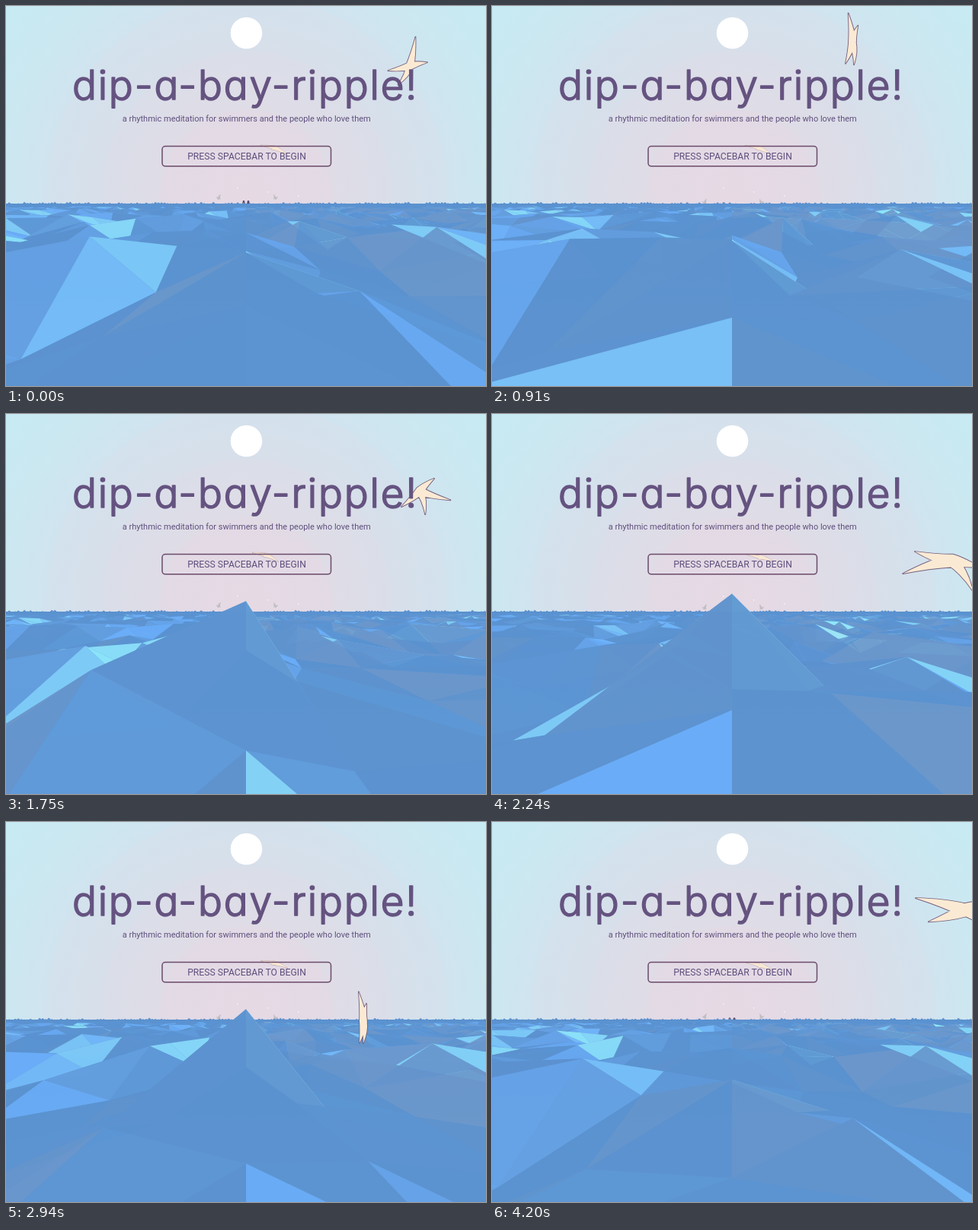
An HTML page with a canvas that plays this animation: 630x500 px, repeating every 4.27 s.

```html
<!DOCTYPE html>
<html lang="en">
<head>
<meta charset="utf-8">
<title>dip-a-bay-ripple!</title>
<style>
  html, body { margin: 0; width: 100%; height: 100%; overflow: hidden; }
  body {
    background: radial-gradient(circle at 316px 250px,
      #e6d9e4 0, #e2dae5 112px, #dfdce6 114px, #dadee9 190px, #d7dfea 192px,
      #d3e2ed 263px, #d0e4ef 265px, #cbe8f1 330px, #c6ebf4 410px);
  }
  canvas, svg { position: absolute; left: 0; top: 0; display: block; }
  text { text-anchor: middle; fill: #5f4f7d; font-family: Roboto, "Open Sans", sans-serif; }
  .title {
    font: 300 53px Inter, Lato, sans-serif; letter-spacing: 1.85px;
    font-feature-settings: "cv11"; fill: #655380;
    stroke: #655380; stroke-width: 1.6px; stroke-linejoin: round;
  }
  .tagline { font-size: 11px; }
  .label { font-size: 12.2px; }
</style>
</head>
<body>
<canvas id="view" width="630" height="500"></canvas>
<svg width="630" height="500">
  <text class="title" x="314" y="123">dip-a-bay-ripple!</text>
  <text class="tagline" x="315.8" y="152">a rhythmic meditation for swimmers and the people who love them</text>
  <rect x="205" y="184.5" width="221.5" height="26.3" rx="4" fill="none" stroke="#6b4a6a" stroke-width="1.5"/>
  <text class="label" x="316" y="202">PRESS SPACEBAR TO BEGIN</text>
</svg>
<script>
const ctx = document.getElementById('view').getContext('2d');
const LOOP = 4270, STEP = 70;
const MID = 315, HORIZON = 260, FOCUS = 300;
const CELL = 1.15, ROWS = 24, TAU = Math.PI * 2;

const TIMES = [0, 910, 1400, 2240, 2940, 3570, 4200];
// Heights of the two nearest crests on the centre line, camera height = 1.
const CREST = [
  [.15, .05, -.36, .18, -.2, .2, -.32],
  [.34, .5, 1.08, 1.24, 1.14, .4, .19]
];
// Gull poses: x, y, then heading and wing directions in degrees.
const GULL = [
  [530, 79, -12, -79, 122],
  [473, 48, -72, -98, 86],
  [500, 36, -80, -90, 92],
  [603, 193, 14, 165, 55],
  [469, 262, -80, -99, 90],
  [573, 200, 66, -114, -6],
  [620, 116, -18, 194, 40]
];

// Facet colours from shaded to glinting.
const RAMP = [
  [-.8, [108, 151, 203]], [-.25, [90, 146, 208]], [.25, [91, 148, 210]], [.45, [99, 159, 224]],
  [.68, [107, 174, 252]], [.88, [131, 211, 251]], [1.15, [147, 240, 253]], [1.45, [181, 233, 245]]
];

const mix = (a, b, u) => a + (b - a) * u;
const mixAll = (a, b, u) => a.map((v, i) => mix(v, b[i], u));
const ease = u => u * u * (3 - 2 * u);
const clamp = (v, lo, hi) => Math.min(hi, Math.max(lo, v));
const rgba = (c, alpha) => `rgba(${c.map(Math.round)},${alpha})`;

function rand(i, j, k) {
  const s = Math.sin(i * 127.1 + j * 311.7 + k * 74.7) * 43758.5453;
  return s - Math.floor(s);
}

function fillPoly(pts, style) {
  ctx.beginPath();
  pts.forEach(([x, y]) => ctx.lineTo(x, y));
  ctx.closePath();
  ctx.fillStyle = style;
  ctx.fill();
}

function segment(t) {
  let i = 0;
  while (i < TIMES.length - 2 && t >= TIMES[i + 1]) i++;
  return { i, u: clamp((t - TIMES[i]) / (TIMES[i + 1] - TIMES[i]), 0, 1) };
}

function rampColor(v) {
  let n = 0;
  while (n < RAMP.length - 2 && v > RAMP[n + 1][0]) n++;
  const [a, from] = RAMP[n], [b, to] = RAMP[n + 1];
  return mixAll(from, to, clamp((v - a) / (b - a), 0, 1));
}

// One vertex of the water sheet: each rides its own small circle.
function vertex(i, j, t, { i: key, u }) {
  const cycles = 3 + Math.floor(rand(i, j, 1) * 3);
  const angle = TAU * (cycles * t / LOOP + rand(i, j, 2));
  const row = Math.max(j, 0);
  let x = 0, z = 1.9 + j * CELL + .03 * row * row, h;
  if (i) {
    x = (i + (rand(i, j, 3) - .5) * .6) * CELL * (1 + .02 * row) + .2 * Math.cos(angle);
    z += (rand(i, j, 4) - .5) * .4;
  }
  if (!i && CREST[j]) h = mix(CREST[j][key], CREST[j][key + 1], ease(u));
  else h = (.3 + .28 * rand(i, j, 5)) * Math.sin(angle);
  return { x, z, h, px: MID + FOCUS * x / z, py: HORIZON + FOCUS * (1 - h) / z };
}

function drawFacet(a, b, c, seed) {
  const ux = b.x - a.x, uh = b.h - a.h, uz = b.z - a.z;
  const vx = c.x - a.x, vh = c.h - a.h, vz = c.z - a.z;
  const nx = uh * vz - uz * vh, nh = uz * vx - ux * vz, nz = ux * vh - uh * vx;
  const scale = Math.sign(nh) / Math.hypot(nx, nh, nz);
  const glint = 1.6 * scale * (.9 * nx + .3 * nz) + (seed - .5) * .5;
  fillPoly([[a.px, a.py], [b.px, b.py], [c.px, c.py]], rgba(rampColor(glint), .9));
}

function drawSea(t, seg) {
  const g = ctx.createLinearGradient(0, HORIZON, 0, 500);
  g.addColorStop(0, '#5a92d0');
  g.addColorStop(1, '#6898ce');
  ctx.fillStyle = g;
  ctx.fillRect(0, HORIZON, 630, 240);

  // Rough skyline
  for (let x = 0; x < 630; x += 4) {
    const h = 2.6 * rand(x, 0, 6) * Math.abs(Math.sin(t / 260 + rand(x, 0, 7) * TAU));
    fillPoly([[x - 3, 261], [x, HORIZON - h], [x + 4, 261]], '#5a90cd');
  }

  for (let j = ROWS; j >= 0; j--) {
    const reach = Math.ceil(MID / FOCUS * (1.9 + j * CELL + .03 * j * j) / (CELL * (1 + .02 * j))) + 2;
    for (let i = -reach; i < reach; i++) {
      const a = vertex(i, j, t, seg), b = vertex(i + 1, j, t, seg);
      const c = vertex(i, j - 1, t, seg), d = vertex(i + 1, j - 1, t, seg);
      const s1 = rand(i, j, 8), s2 = rand(i, j, 9);
      // Diagonals mirror about the centre line.
      if (i < 0) { drawFacet(a, b, c, s1); drawFacet(b, c, d, s2); }
      else { drawFacet(a, b, d, s1); drawFacet(a, c, d, s2); }
    }
  }
}

// A curved blade from the body to a tip.
function blade(path, x, y, degrees, length, width, bend) {
  const r = degrees * Math.PI / 180, cos = Math.cos(r), sin = Math.sin(r);
  const at = (along, across) => [x + along * cos - across * sin, y + along * sin + across * cos];
  path.moveTo(...at(0, -width));
  path.quadraticCurveTo(...at(length * .45, bend - width * .9), ...at(length, 0));
  path.quadraticCurveTo(...at(length * .4, bend + width * .4), ...at(0, width));
  path.closePath();
}

function drawGull({ i, u }, t) {
  const [x, y, heading, wingA, wingB] = mixAll(GULL[i], GULL[i + 1], u);
  const size = mix(39, 66, ease(clamp((x - 530) / 60, 0, 1)));
  const glare = Math.abs(t - 1400) < 100;
  const path = new Path2D();
  blade(path, x, y, wingA, size, size * .13, size * .08);
  blade(path, x, y, wingB, size * .75, size * .12, -size * .06);
  blade(path, x, y, heading, size * .6, size * .13, 0);
  blade(path, x, y, heading + 180, size * .75, size * .13, 0);
  ctx.strokeStyle = glare ? '#fff' : '#75607f';
  ctx.fillStyle = glare ? '#fff' : '#fbead3';
  ctx.lineWidth = 1.8;
  ctx.lineJoin = 'round';
  ctx.stroke(path);
  ctx.fill(path);
}

function drawFarLife(t) {
  const x = 346 - 68 * Math.exp(-(((t - 1400) / 260) ** 2));
  const y = 186 + 2 * Math.sin(t / 300), flap = 4 * Math.cos(t / 140);
  const path = new Path2D();
  blade(path, x + 4, y, 190, 16, 2, 1);
  blade(path, x + 4, y, 22 + flap, 21, 3, -1);
  ctx.strokeStyle = 'rgba(160,135,145,.6)';
  ctx.fillStyle = '#f9e8d3';
  ctx.lineWidth = 1;
  ctx.stroke(path);
  ctx.fill(path);

  // Tiny birds over the skyline
  const bob = 3 - 3 * Math.cos(t / 290);
  for (const side of [-1, 1]) {
    const bird = new Path2D();
    blade(bird, 316.5 + side * 37, 254 + bob, -90 - side * 20, 7, 2, side);
    blade(bird, 316.5 + side * 37, 254 + bob, -90 + side * 50, 5, 1.5, 0);
    ctx.fillStyle = 'rgba(182,182,186,.8)';
    ctx.fill(bird);
  }
  ctx.fillStyle = 'rgba(255,250,240,.8)';
  for (let k = 0; k < 3; k++) ctx.fillRect(303 + k * 40, 239 + k * 5, 1.5, 1.5);
}

// Feet show for a moment either side of the loop point.
function drawSwimmer(t) {
  const sink = 5 * clamp(Math.min(t, LOOP - t) / 250, 0, 1);
  for (const x of [312, 318]) {
    fillPoly([[x - 2, 261], [x - 1, 256 + sink], [x + 1, 256 + sink], [x + 2, 261]], '#594b6c');
  }
}

function draw(t) {
  const seg = segment(t);
  ctx.clearRect(0, 0, 630, 500);
  ctx.beginPath();
  ctx.arc(315.5, 35.5, 20.8, 0, TAU);
  ctx.fillStyle = '#fff';
  ctx.fill();
  drawFarLife(t);
  drawSwimmer(t);
  drawSea(t, seg);
  drawGull(seg, t);
}

let shown = -1;
function frame(now) {
  const t = Math.floor((now % LOOP) / STEP) * STEP;
  if (t !== shown) draw(shown = t);
  requestAnimationFrame(frame);
}
frame(0);
</script>
</body>
</html>
```
